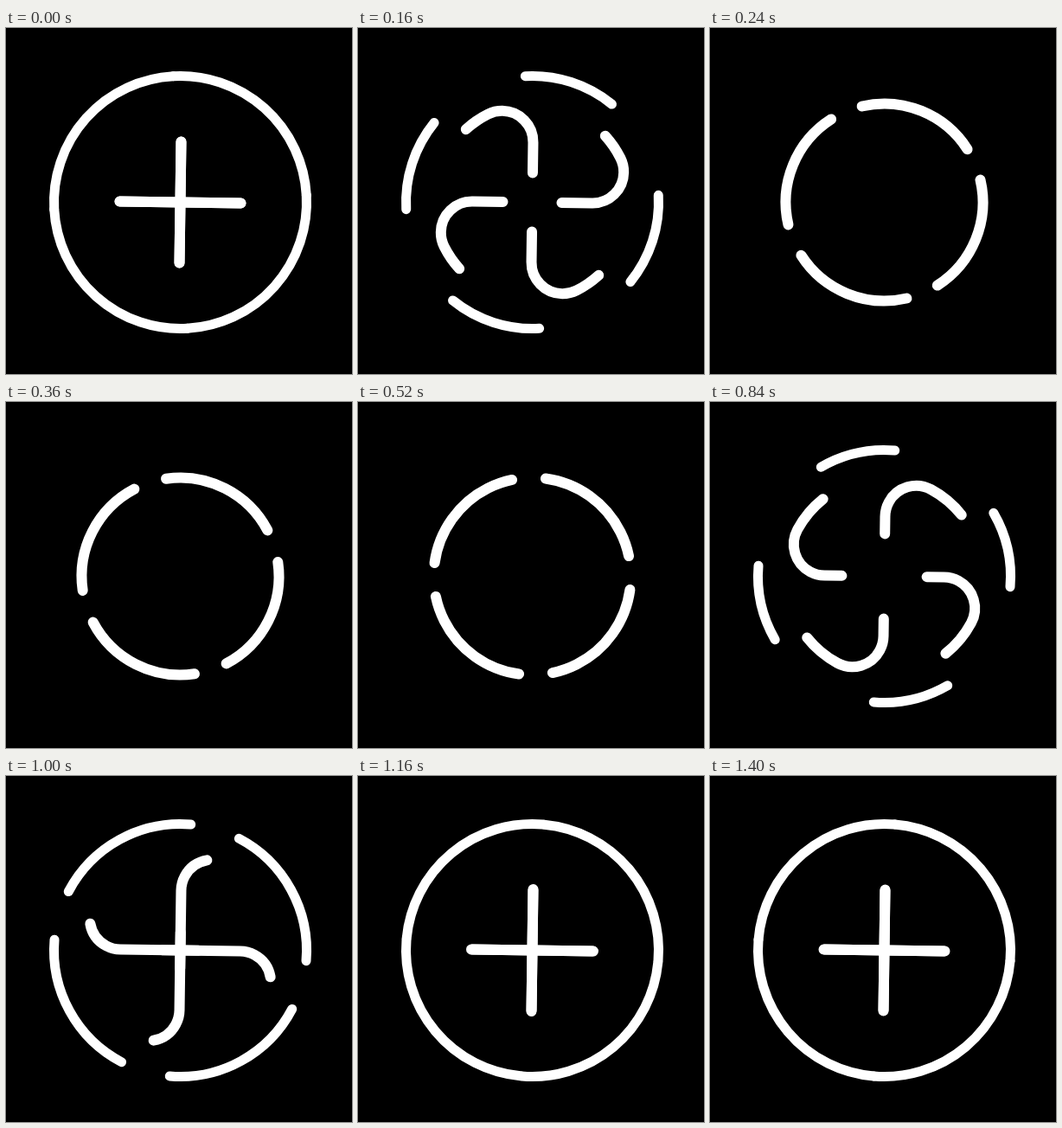
An HTML page with a canvas that plays this animation: 400 px wide and 400 px high, repeating every 1520 ms.

```html
<!DOCTYPE html>
<html>
<head>
<meta charset="utf-8">
<style>
  html, body { margin: 0; height: 100%; overflow: hidden; background: #000; }
  canvas { display: block; }
</style>
</head>
<body>
<canvas width="400" height="400"></canvas>
<script>
const ctx = document.querySelector('canvas').getContext('2d');
const LOOP = 1520, STEP = 40, LAST = 1400;
const ORBIT = 114, BEND = 36, RING = 146, HALF = 70, TRAVEL = 892.9, RING_TRAVEL = 196;
const rad = deg => deg * Math.PI / 180;

// Out along a spoke, once round the orbit, back in along the same spoke.
const spokeEnd = -Math.sqrt((ORBIT - BEND) ** 2 - BEND ** 2);
const join = Math.asin(BEND / (ORBIT - BEND));
const up = -Math.PI / 2;
const track = new Path2D();
track.moveTo(0, HALF);
track.arc(-BEND, spokeEnd, BEND, 0, up - join, true);
track.arc(0, 0, ORBIT, up - join, up + join, true);
track.arc(BEND, spokeEnd, BEND, up + join, -Math.PI, true);
track.lineTo(0, HALF);

// [time, distance along the track, speed]
const keys = [
  [0, 0, 0], [160, 104, 1.38], [360, 394, 1.1], [520, 541, 0.9],
  [680, 678, 0.74], [1000, 843, 0.43], [1120, 890.5, 0.03], [1400, TRAVEL, 0]
];

function distanceAt(t) {
  const i = Math.max(1, keys.findIndex(k => k[0] >= t));
  const [t0, d0, v0] = keys[i - 1], [t1, d1, v1] = keys[i];
  const h = t1 - t0, u = (t - t0) / h, w = 1 - u;
  return w * w * ((1 + 2 * u) * d0 + u * h * v0) + u * u * ((3 - 2 * u) * d1 - w * h * v1);
}

function ringArc(from, to) {
  ctx.beginPath();
  ctx.arc(0, 0, RING, rad(from - 90), rad(to - 90));
  ctx.stroke();
}

function draw(now) {
  const t = Math.min(LAST, Math.floor(now % LOOP / STEP + 0.02) * STEP);
  const d = distanceAt(t);
  const leaving = 1 - d / RING_TRAVEL;
  const returning = Math.min(1, 1 - (TRAVEL - d) / RING_TRAVEL);

  ctx.setTransform(1, 0, 0, 1, 0, 0);
  ctx.fillStyle = '#000';
  ctx.fillRect(0, 0, 400, 400);
  ctx.translate(201.5, 201.5);
  ctx.rotate(rad(0.8));
  ctx.strokeStyle = '#fff';
  ctx.lineCap = 'round';

  for (let i = 0; i < 4; i++) {
    ctx.lineWidth = 11;
    ctx.setLineDash([]);
    if (leaving > 0) ringArc(-4, -4 + 90 * leaving);
    if (returning > 0) ringArc(94 - 90 * returning, 94);
    ctx.lineWidth = 12;
    ctx.setLineDash([2 * HALF, 3000]);
    ctx.lineDashOffset = -d;
    ctx.stroke(track);
    ctx.rotate(Math.PI / 2);
  }
}

(function tick() {
  draw(performance.now());
  requestAnimationFrame(tick);
})();
</script>
</body>
</html>
```
